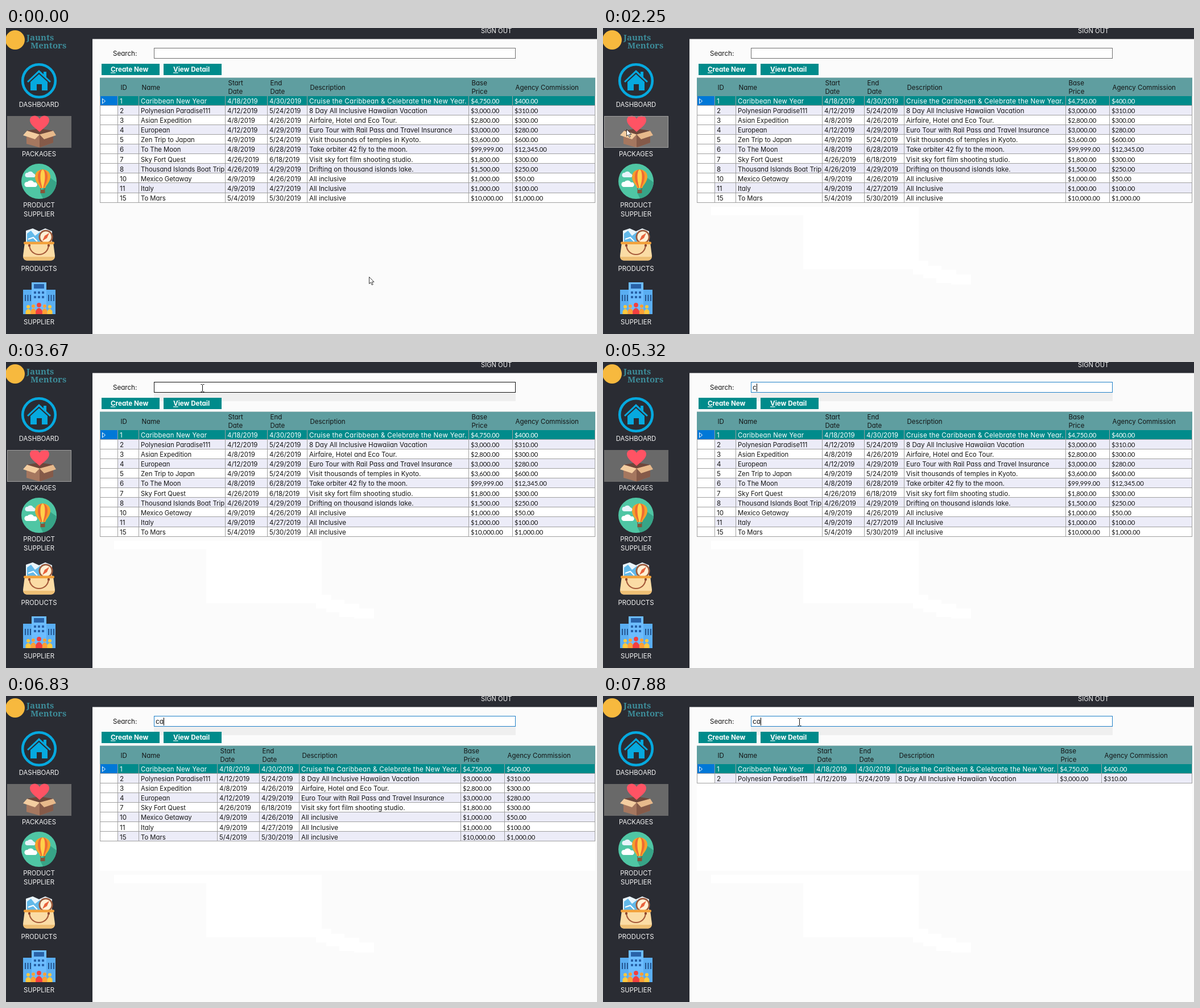
An HTML page for the animation above (8 s loop, 1039 by 539 pixels).

```html
<!DOCTYPE html>
<html lang="en">
<head>
<meta charset="utf-8">
<title>Package list</title>
<style>
  html, body { margin: 0; width: 100%; height: 100%; overflow: hidden; background: #fcfcfc; }
  svg { display: block; width: 100vw; height: 100vh; }
  text { font-family: Inter, "Open Sans", sans-serif; font-size: 11.6px; font-feature-settings: "cv11"; fill: #141414; white-space: pre; }
  .name { font-size: 11.3px; }
  .money { font-family: Lato, "Liberation Sans", sans-serif; font-size: 11.3px; letter-spacing: -.1px; }
  .date { font-size: 11.5px; }
  .head { font-size: 11.5px; }
  .nav { font-size: 11.4px; fill: #f4f4f4; text-anchor: middle; }
  .account { font-size: 11.2px; fill: #f4f4f4; }
  .button { font-weight: 700; font-size: 11.6px; fill: #fff; }
  .brand { font: bold 15px "Noto Serif", "Liberation Serif", serif; fill: #3d8c99; }
  .selected text { fill: #fff; }
  .selected .name, .selected .about { letter-spacing: .27px; }
</style>
</head>
<body>
<svg id="stage" viewBox="0 0 1039 539" xmlns="http://www.w3.org/2000/svg"></svg>
<script>
const LOOP = 8000;
const stage = document.getElementById('stage');

const rect = (x, y, w, h, fill, more = '') =>
  `<rect x="${x}" y="${y}" width="${w}" height="${h}" fill="${fill}" ${more}/>`;
const circle = (x, y, r, fill, more = '') => `<circle cx="${x}" cy="${y}" r="${r}" fill="${fill}" ${more}/>`;
const path = (d, fill, more = '') => `<path d="${d}" fill="${fill}" ${more}/>`;
const label = (x, y, text, cls = '') =>
  `<text x="${x}" y="${y}" class="${cls}">${text.replace('&', '&amp;')}</text>`;
const group = (id, body) => `<g id="${id}">${body}</g>`;

const packages = [
  [1, 'Caribbean New Year', '4/18/2019', '4/30/2019', 'Cruise the Caribbean & Celebrate the New Year.', '$4,750.00', '$400.00'],
  [2, 'Polynesian Paradise111', '4/12/2019', '5/24/2019', '8 Day All Inclusive Hawaiian Vacation', '$3,000.00', '$310.00'],
  [3, 'Asian Expedition', '4/8/2019', '4/26/2019', 'Airfaire, Hotel and Eco Tour.', '$2,800.00', '$300.00'],
  [4, 'European', '4/12/2019', '4/29/2019', 'Euro Tour with Rail Pass and Travel Insurance', '$3,000.00', '$280.00'],
  [5, 'Zen Trip to Japan', '4/9/2019', '5/24/2019', 'Visit thousands of temples in Kyoto.', '$3,600.00', '$600.00'],
  [6, 'To The Moon', '4/8/2019', '6/28/2019', 'Take orbiter 42 fly to the moon.', '$99,999.00', '$12,345.00'],
  [7, 'Sky Fort Quest', '4/26/2019', '6/18/2019', 'Visit sky fort film shooting studio.', '$1,800.00', '$300.00'],
  [8, 'Thousand Islands Boat Trip', '4/26/2019', '4/29/2019', 'Drifting on thousand islands lake.', '$1,500.00', '$250.00'],
  [10, 'Mexico Getaway', '4/9/2019', '4/26/2019', 'All inclusive', '$1,000.00', '$50.00'],
  [11, 'Italy', '4/9/2019', '4/27/2019', 'All Inclusive', '$1,000.00', '$100.00'],
  [15, 'To Mars', '5/4/2019', '5/30/2019', 'All inclusive', '$10,000.00', '$1,000.00']
];
const headings = ['ID', 'Name', 'Start Date', 'End Date', 'Description', 'Base Price', 'Agency Commission'];
const cellClass = ['', 'name', 'date', 'date', 'about', 'money', 'money'];

function table(rows, shift) {
  const edges = [196, 233, 385, 459, 529, 813, 890].map((x, i) => i > 1 ? x - shift : x);
  const pitch = 17.05;
  const line = r => Math.floor(119.5 + pitch * r);
  let out = rect(165, 88, 871, 32, '#5f9ea0') + rect(165, 87, 871, 1, '#b5c9c9');
  headings.forEach((h, i) => {
    const x = edges[i] + 5.5;
    const words = /Date|Price/.test(h) ? h.split(' ') : [h];
    words.forEach((w, k) => out += label(x, (words.length > 1 ? 101 : 108.5) + 15.3 * k, w, 'head'));
  });
  rows.forEach((row, r) => {
    const y = line(r) + 1, h = line(r + 1) - y;
    out += rect(165, y, 871, h, r ? r % 2 ? '#ececf8' : '#fff' : '#008b8b') + rect(165, y, 31, h, '#fff');
    out += `<g class="${r ? '' : 'selected'}">` +
      row.map((v, i) => label(edges[i] + 4, 133.2 + pitch * r, String(v), cellClass[i])).join('') + '</g>';
    out += rect(165, y + h, 871, 1, '#a0a0a0');
  });
  [165, ...edges, 1035].forEach(x => out += rect(x, 120, 1, line(rows.length) - 120, '#a0a0a0'));
  return out + rect(166, 120, 30, 16, '#0078d7') +
    path('M169.5 124.5V133L174.5 128.7Z', 'none', 'stroke="#fff"');
}

function house() {
  return circle(58, 93, 28.8, 'none', 'stroke="#06a9df" stroke-width="4.6"') +
    path('M37 94L58 74L66 81.5V77H71V86.5L79 94L77 96L58 78.5L39 96Z', '#06a9df') +
    path('M43 95L58 81.3L73 95V110H63V99H54V110H43Z', '#06a9df');
}

function parcel() {
  return path('M36 182L58 186L83 182V202L59 210.5L36 204Z', '#a5775f') +
    path('M59 187L83 182V202L59 210.5Z', '#855a49') +
    path('M36 181L59 177L83 181L59 188Z', '#6d473b') +
    path('M59 183C52 176 42 171 42 162C42 154 54 151 59 160C64 151 76 154 76 162C76 171 66 176 59 183Z', '#ff5364') +
    path('M37 181L59 187.5L51 196L30 189Z', '#f3cda0') +
    path('M83 181L59 187.5L67 196L88 189Z', '#e7b98b');
}

function balloon() {
  return circle(58, 270, 31, '#4fc6a4') +
    path('M78 264L89 272C87 289 76 299 65 300L60 290Z', '#37a487') +
    path('M51 262C51 245 78 245 78 262C78 271 71 276 69 282H60C58 276 51 271 51 262Z', '#f4a12b') +
    path('M56 262C56 245 73 245 73 262C73 272 68 276 67 282H62C61 276 56 272 56 262Z', '#ef6a33') +
    path('M60.5 262C60.5 245 68.5 245 68.5 262C68.5 272 66 276 65.5 282H63.5C63 276 60.5 272 60.5 262Z', '#ffd04a') +
    path('M60.5 282L61.5 286M68.5 282L67.5 286', 'none', 'stroke="#6f4a35"') +
    rect(60.5, 285, 8, 6, '#875438', 'rx="1"') +
    path('M37 263A4 4 0 0 1 38 255A6 6 0 0 1 48 256A4 4 0 0 1 50 263Z', '#e8f4fb') +
    path('M36 280A4.5 4.5 0 0 1 38 271A6.5 6.5 0 0 1 49 272A4.2 4.2 0 0 1 52 280Z', '#fff');
}

function bag() {
  return path('M35 357L47 353L58 358L69 353L81 358V384H35Z', '#e9f4fa') +
    path('M37 362L44 357L51 366L60 359V384H37Z', '#62b9ea') +
    path('M39 372L48 369L55 376', 'none', 'stroke="#fff" stroke-width="2"') +
    circle(70, 368, 12.5, '#9c5a3c') + circle(70, 368, 9.8, '#fff0d5') +
    path('M76 361L72 370L64 375L68 366Z', '#e8623d') +
    path('M33 378H83L86 401C86 407 82 409.5 78 409.5H38C33 409.5 30 407 30 401Z', '#fbdca5') +
    path('M30 403H86C85 408 82 409.5 78 409.5H38C33 409.5 31 408 30 403Z', '#eebf75') +
    rect(31, 376.5, 54, 4.5, '#f3a23c', 'rx="2"') +
    path('M41 381C41 405 75 405 75 381', 'none', 'stroke="#a65b3b" stroke-width="2.2"') +
    circle(41, 383, 2.2, '#8e4930') + circle(75, 383, 2.2, '#8e4930');
}

function offices() {
  const person = (x, y, s, color) => circle(x, y, 3 * s, color) +
    path(`M${x - 4.5 * s} 504V${y + 8 * s}Q${x} ${y} ${x + 4.5 * s} ${y + 8 * s}V504Z`, color);
  let out = rect(30, 461, 17, 43, '#5aaef2') + rect(70, 461, 17, 43, '#5aaef2') +
    rect(45, 448, 26, 56, '#6cbcff') + rect(49, 451, 18, 8, '#2862a8');
  for (let i = 0; i < 3; i++) {
    out += rect(33 + 4.5 * i, 470, 2, 11, '#24558f') + rect(74 + 4.5 * i, 470, 2, 11, '#24558f');
    for (let j = 0; j < 2; j++) out += rect(49 + 7 * i, 464 + 8 * j, 4, 4, '#2862a8');
  }
  [[39, 491, '#ffc83d'], [48, 490, '#ff9f35'], [68, 490, '#ff9f35'], [77, 491, '#ffc83d']]
    .forEach(([x, y, c]) => out += person(x, y, 1, c));
  return out + person(58, 488, 1.3, '#f23f3f');
}

const nav = [['DASHBOARD', 139], ['PACKAGES', 226], ['PRODUCT', 316], ['SUPPLIER', 331.5], ['PRODUCTS', 427.5], ['SUPPLIER', 522]];

// Areas repainted pure white: x, y, width, height, time
const repaints = [
  [612, 434, 35, 18, 550], [586, 426, 35, 23, 680], [563, 419, 32, 22, 820], [545, 410, 27, 24, 960],
  [352, 315, 203, 110, 960], [190, 315, 171, 15, 1090], [165, 87, 871, 221, 5440]
];

const sidebar = '#2a2c33';
stage.innerHTML =
  rect(0, 0, 1039, 539, '#fbfbfb') +
  repaints.map(r => rect(...r.slice(0, 4), '#fff', 'class="repaint"')).join('') +
  rect(0, 0, 1039, 19.4, sidebar) + rect(0, 0, 152, 539, sidebar) +
  circle(16, 21, 17, '#f7b93e') + label(36, 21.5, 'Jaunts', 'brand') + label(43, 36, 'Mentors', 'brand') +
  label(835, 8.5, 'SIGN OUT', 'account') +
  house() +
  rect(2, 155, 113, 56, '#696969', 'id="panel"') + parcel() +
  rect(2.5, 155.5, 112, 55, 'none', 'id="panelEdge" stroke="#a0a0a0"') +
  balloon() + bag() + offices() +
  nav.map(([t, y]) => label(58, y, t, 'nav')).join('') +
  label(188, 49, 'Search:') +
  rect(260, 54, 636, 15, '#efefef', 'id="strip"') +
  rect(260.5, 35.5, 635, 18, '#fff', 'id="field"') +
  `<text id="query" x="263" y="49.3" style="font-size:12px"></text>` +
  rect(263, 38, 1, 14, '#000', 'id="caret"') +
  rect(168, 63, 102, 20, '#008b8b') + rect(277, 63, 102, 20, '#008b8b', 'id="detail"') +
  label(184, 77.3, '<tspan text-decoration="underline">C</tspan>reate New', 'button') +
  label(294, 77.3, '<tspan text-decoration="underline">V</tspan>iew Detail', 'button') +
  group('table0', table(packages, 0)) +
  group('table1', table(packages.filter(p => ![5, 6, 8].includes(p[0])), 14)) +
  group('table2', table(packages.slice(0, 2), 14)) +
  group('arrow', path('M.5 .5V12.5L3.2 10L5.2 14.5L7.2 13.7L5.2 9.3H9Z', '#fff', 'stroke="#222" stroke-width=".9"')) +
  group('resize', path('M0 -9L3.5 -5H1V-2H4V2H1V5H3.5L0 9L-3.5 5H-1V2H-4V-2H-1V-5H-3.5Z', '#fff', 'stroke="#222" stroke-width=".9"') +
    rect(-4, -.6, 8, 1.2, '#222')) +
  group('beam', path('M-3 -6.5H-1L0 -5.5L1 -6.5H3M0 -5.5V5.5M-3 6.5H-1L0 5.5L1 6.5H3', 'none', 'stroke="#111"'));

const el = id => document.getElementById(id);
const show = (node, on) => node.setAttribute('display', on ? 'inline' : 'none');
const latest = (steps, t) => steps.reduce((found, step) => t >= step[0] ? step : found);
const within = (t, ...spans) => spans.some(([a, b]) => t >= a && t < b);

// Time, x, y, pointer shape
const pointer = [
  [0, 638, 438, 'arrow'], [550, 612, 434, 'arrow'], [680, 586, 426, 'arrow'], [820, 563, 419, 'arrow'],
  [960, 352, 315, 'arrow'], [1090, 208, 246, 'arrow'], [1210, 193.5, 238, 'resize'],
  [1330, 44, 184, 'arrow'], [1470, 18, 176, 'arrow'], [1610, 25, 177, 'arrow'], [1730, 34, 178, 'arrow'],
  [1850, 41, 178, 'arrow'], [3270, 122, 152, 'arrow'], [3390, 302, 72, 'arrow'], [3520, 345, 55, 'arrow'],
  [3670, 345.5, 46, 'beam'], [5320, 0, 0, ''], [5440, 345.5, 46, 'beam'], [6830, 0, 0, ''], [6980, 345.5, 46, 'beam']
];
const tableSteps = [[0, 0], [5440, 1], [6980, 2]];
const querySteps = [[0, '', 263], [5320, 'c', 270], [6830, 'ca', 277]];
const fieldSteps = [[0, '#6f6f6f'], [3670, '#111'], [4170, '#2080c8']];
const patches = stage.querySelectorAll('.repaint');

function draw(t) {
  const [, x, y, shape] = latest(pointer, t);
  for (const id of ['arrow', 'resize', 'beam']) {
    show(el(id), id === shape);
    el(id).setAttribute('transform', `translate(${x} ${y})`);
  }
  patches.forEach((p, i) => show(p, t >= repaints[i][4]));
  el('panel').setAttribute('fill', within(t, [2110, 3270]) ? '#747474' : '#696969');
  show(el('panelEdge'), within(t, [2110, 4290]));
  el('detail').setAttribute('fill', within(t, [3390, 3520]) ? '#149696' : '#008b8b');
  show(el('strip'), t >= 3670);
  el('field').setAttribute('stroke', latest(fieldSteps, t)[1]);

  const [, typed, caretX] = latest(querySteps, t);
  el('query').textContent = typed;
  el('caret').setAttribute('x', caretX);
  show(el('caret'), within(t, [4290, 4790], [5320, 5810], [6430, 7380], [7880, LOOP]));
  const shown = latest(tableSteps, t)[1];
  for (let i = 0; i < 3; i++) show(el('table' + i), i === shown);
}

const start = performance.now();
function tick() {
  draw((performance.now() - start) % LOOP);
  requestAnimationFrame(tick);
}
tick();
</script>
</body>
</html>
```
